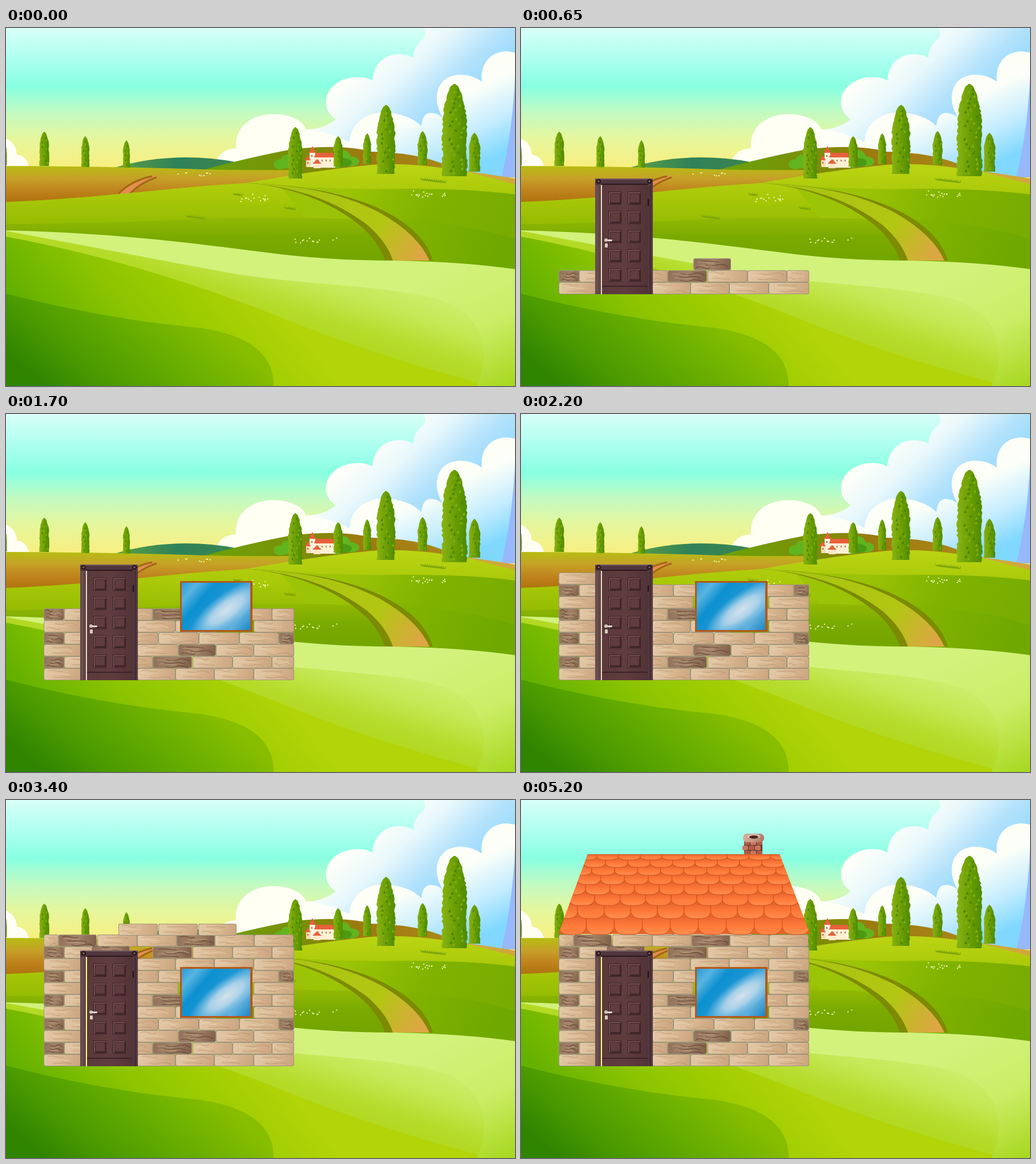
An HTML page with a canvas that plays this animation: 892 px wide and 628 px high, repeating every 8 s.

```html
<!DOCTYPE html>
<html lang="en">
<head>
<meta charset="utf-8">
<title>Building a house</title>
<style>
html, body { margin: 0; width: 100%; height: 100%; overflow: hidden; }
canvas { display: block; }
</style>
</head>
<body>
<canvas id="stage" width="892" height="628"></canvas>
<script>
const W = 892, H = 628, LOOP = 8000, STEP = 50;
const stage = document.getElementById('stage').getContext('2d');
let ctx = stage;

const noise = n => { const v = Math.sin(n * 127.1 + 3.7) * 43758.5453; return v - Math.floor(v); };

// Stops are evenly spread colours, or [position, colour] pairs.
function gradient(x0, y0, x1, y1, ...stops) {
  const g = ctx.createLinearGradient(x0, y0, x1, y1);
  stops.forEach((s, i) => Array.isArray(s) ? g.addColorStop(...s) : g.addColorStop(i / (stops.length - 1), s));
  return g;
}
function shape(d, fill, stroke, width = 1) {
  const path = new Path2D(d);
  if (fill) { ctx.fillStyle = fill; ctx.fill(path); }
  if (stroke) { ctx.strokeStyle = stroke; ctx.lineWidth = width; ctx.stroke(path); }
}
function rect(x, y, w, h, fill) { ctx.fillStyle = fill; ctx.fillRect(x, y, w, h); }
function rounded(x, y, w, h, r, fill) {
  ctx.beginPath(); ctx.roundRect(x, y, w, h, r);
  ctx.fillStyle = fill; ctx.fill();
}
function oval(x, y, rx, ry, fill) {
  ctx.beginPath(); ctx.ellipse(x, y, rx, ry, 0, 0, 7);
  ctx.fillStyle = fill; ctx.fill();
}

// ---------- landscape ----------
function drawSky() {
  rect(0, 0, W, 270, gradient(0, 0, 0, 250, [0, '#d8fff8'], [.2, '#b0fff0'], [.41, '#88ffe2'],
    [.6, '#c4fac0'], [.78, '#e6f69c'], [1, '#fbee7c']));
  shape('M0 194Q18 202 19 222Q36 224 40 242H0Z', '#fffff4');
  shape('M732 0Q740 12 728 22Q714 34 714 52C694 40 646 42 642 92C618 78 566 88 561 126Q559 148 578 160Q556 178 524 178L520 260H892V0Z',
    gradient(640, 50, 800, 230, [0, '#fffff8'], [.25, '#e8f8fc'], [.5, '#b4e2fc'], [1, '#70d0ff']));
  shape('M370 231Q378 212 403 211C400 172 432 151 468 151C500 151 522 164 526 178Q560 180 602 200C604 166 632 148 662 148Q706 150 728 172Q730 148 746 149Q760 150 767 160C742 120 758 82 796 82Q818 82 834 94C830 62 850 41 878 41L892 43V262H370Z',
    gradient(640, 120, 720, 290, [0, '#fffff4'], [.35, '#fcfff8'], [.7, '#c4ecff'], [1, '#80d8ff']));
  shape('M892 86Q888 180 868 262H892Z', '#98b8fc');
}

function drawVillage() {
  const leaf = '#62b41e';
  [[481, 239, 12, 9], [493, 234, 12, 12], [590, 228, 14, 14], [605, 234, 14, 9], [580, 236, 12, 10]]
    .forEach(([x, y, rx, ry]) => oval(x, y, rx, ry, leaf));
  oval(590, 236, 16, 8, '#4c9a14');
  rect(540, 224, 37, 21, '#fff0d4');
  rect(532, 218, 10, 26, '#fff4dc');
  rect(526, 231, 8, 13, '#f8dcb8');
  rect(539, 236, 12, 10, '#ffe8c8');
  shape('M531 219L537 207L543 219ZM540 227L543 219H572L578 227ZM524 232L529 223L534 232ZM537 238L545 230L553 238Z', '#e8603c');
  [546, 553, 560, 567].forEach(x => rect(x, 231, 2, 3, '#b87858'));
  rect(535, 223, 2, 3, '#a86848');
  rect(528, 235, 2, 3, '#a86848');
}

function drawCypress(x, top, bottom, width) {
  const height = bottom - top, n = Math.round(height / 4), left = [], right = [];
  const body = u => Math.min(1, Math.sqrt(u * 2.4) + .05);
  for (let i = 0; i <= n; i++) {
    const u = i / n;
    const edge = side => width / 2 * body(u) * (.84 + .16 * noise(i * 2 + side + x));
    left.push(`${x - edge(0)} ${top + u * height}`);
    right.unshift(`${x + edge(1)} ${top + u * height}`);
  }
  shape(`M${x} ${top}L${left.join('L')}L${right.join('L')}Z`,
    gradient(x - width / 2, 0, x + width / 2, 0, '#8ab414', '#6c9e04', '#4c8a00'));
  for (let i = 3; i < n; i++) {
    const px = x + (noise(i * 7 + x) - .5) * width * .6 * body(i / n), py = top + height * i / n;
    shape(`M${px} ${py}l${width * .09} -5l1 6Z`, i % 2 ? '#4a8400' : '#80b00c');
  }
}

function drawFlowers(x, y, w, h, count) {
  for (let i = 0; i < count; i++)
    oval(x + noise(i + x) * w, y + noise(i * 3 + y) * h, 1.2, 1.1, '#f8fcc0');
}
function drawTuft(x, y, w) {
  for (let i = 0; i < w; i += 4)
    shape(`M${x + i} ${y + i * .12}l-3 -4l7 3l3 -4l-1 6Z`, '#7ea60c');
}

function drawFields() {
  shape('M190 245Q250 227 316 227Q360 227 402 235L350 250H190Z', gradient(200, 0, 400, 0, '#5a9c48', '#2e8258', '#3c8450'));
  shape('M345 249Q430 226 500 213Q590 203 640 217Q720 218 772 241L720 270H345Z',
    gradient(370, 0, 770, 0, [0, '#6ca008'], [.4, '#7d8c08'], [.65, '#a07810'], [1, '#a88818']));
  drawVillage();
  shape('M0 242Q200 243 345 248Q420 250 500 249L560 280L0 310Z',
    gradient(0, 242, 0, 304, [0, '#b6bd12'], [.35, '#c6a128'], [.7, '#bf821c'], [1, '#b07410']));
  shape('M196 292Q222 268 270 258L256 264Q228 274 216 292Z', '#e68d50');
  shape('M196 292Q218 268 256 260M216 292Q234 272 264 262', null, '#a06814', 3);
  shape('M0 305C150 300 280 280 420 272Q540 250 640 240Q740 232 892 271V430H0Z',
    gradient(0, 245, 0, 350, '#b9d312', '#a8c808', '#92ba00'));
  shape('M800 250Q850 257 892 264V274Z', '#d0a83c');
  shape('M480 277Q600 284 700 282Q820 282 892 292V430H600Z', gradient(600, 280, 850, 400, '#9cc406', '#80b300', '#78ac00'));
  shape('M650 335Q780 336 892 370V430H690Z', gradient(660, 340, 860, 400, '#86b600', '#6fa800'));
  shape('M0 344Q200 342 330 335Q500 330 620 336L690 410H520Q300 370 0 356Z',
    gradient(0, 335, 0, 400, '#90b804', '#7aaa00', '#74a600'));
  shape('M400 271C500 273 585 312 630 355Q656 382 664 408H748Q732 352 650 315C590 288 510 274 400 271Z', '#7d8a04');
  shape('M404 271C520 276 590 312 634 346Q668 376 678 408H742Q722 362 655 324C590 290 520 275 404 271Z',
    gradient(500, 280, 720, 410, [0, '#a8c410'], [.65, '#b2c612'], [1, '#dda644']));
  drawTuft(318, 332, 28); drawTuft(489, 317, 14); drawTuft(400, 293, 10); drawTuft(728, 267, 38);
  drawFlowers(394, 291, 66, 14, 16);
  drawFlowers(506, 368, 74, 9, 14);
  drawFlowers(710, 285, 64, 12, 18);
  drawFlowers(300, 254, 60, 6, 9);
}

function drawForeground() {
  shape('M0 355C200 360 330 378 450 393Q560 408 680 408Q800 410 892 423V628H0Z',
    gradient(760, 430, 860, 640, '#d2f27c', '#cbed66', '#a8d820'));
  shape('M0 356C110 376 230 400 400 431C530 452 690 452 770 480Q840 510 838 580Q834 610 824 628H0Z',
    gradient(700, 450, 640, 640, [0, '#cdee6e'], [.25, '#c4e854'], [.5, '#b6dc2c'], [1, '#a8d008']));
  shape('M0 366C180 400 340 450 500 515Q640 572 826 622V628H0Z',
    gradient(420, 420, 150, 640, [0, '#b2d408'], [.35, '#9ccc00'], [.6, '#8cc400'], [1, '#62b000']));
  shape('M0 466C100 492 220 515 340 526Q470 545 469 628H0Z',
    gradient(330, 490, 150, 700, [0, '#88be00'], [.4, '#64ac00'], [.75, '#489800'], [1, '#2f8400']));
}

function drawLandscape() {
  drawSky();
  drawFields();
  [[0, 208, 241, 3], [67, 182, 242, 18], [139, 190, 244, 15], [211, 197, 245, 13], [582, 190, 243, 17],
   [633, 185, 239, 15], [730, 181, 240, 18], [821, 184, 252, 21], [507, 174, 264, 26],
   [666, 135, 256, 34], [786, 98, 260, 46]].forEach(tree => drawCypress(...tree));
  drawForeground();
}

// ---------- house ----------
function drawBrick({ x, y, w, dark }) {
  rounded(x, y, w, 21, 3, '#9d957c');
  rounded(x + 1, y + 1, w - 2, 19, 3, dark
    ? gradient(x, y, x + w, y + 20, '#90705a', '#a28266', '#7e5c48')
    : gradient(x, y, x + w, y + 20, '#e4caa8', '#d9b892', '#cba47e'));
  ctx.save();
  ctx.globalAlpha = dark ? .75 : .45;
  for (let i = 0; i < (dark ? 5 : 3); i++) {
    const r = noise(x + y * 3 + i), ly = y + 4 + i * (dark ? 3 : 5) + r * 2;
    const start = x + 3 + r * w * .3, length = (w - 8) * (.4 + .3 * r);
    shape(`M${start} ${ly}q${length / 4} ${r * 8 - 4} ${length / 2} 0t${length / 2} ${r * 3}`, null,
      dark ? (i % 2 ? '#c0a284' : '#583c2c') : (i % 2 ? '#f4e4c8' : '#a88260'), 1.2);
  }
  ctx.restore();
}

function drawWindow() {
  rect(305, 293, 127, 89, '#b4581a');
  ctx.save();
  ctx.beginPath(); ctx.rect(308, 296, 120, 83); ctx.clip();
  rect(308, 296, 120, 83, gradient(315, 290, 425, 385, [0, '#2c9ed8'], [.14, '#58b4e0'], [.3, '#0c90d0'],
    [.5, '#1c96d4'], [.8, '#60b0dc'], [1, '#1484c4']));
  ctx.translate(386, 344); ctx.rotate(-.65); ctx.scale(1, .36);
  const shine = ctx.createRadialGradient(0, 0, 0, 0, 0, 78);
  [[0, '#d4e2ec'], [.45, '#c4dcecd0'], [1, '#a0d0ec00']].forEach(s => shine.addColorStop(...s));
  oval(0, 0, 78, 78, shine);
  ctx.restore();
}

function drawDoorLeaf(openness) {
  ctx.save();
  ctx.translate(222, 0); ctx.scale(1 - openness, 1); ctx.translate(-222, 0);
  rect(142, 275, 80, 192, gradient(142, 0, 222, 0, '#5a393c', '#603c3e', '#523438'));
  for (let row = 0; row < 5; row++) for (const x of [153, 187]) {
    const y = 287 + row * 33.7;
    rect(x, y, 23, 23, '#3c2226');
    rect(x + 1, y + 1, 21, 21, '#73504f');
    rect(x + 3, y + 3, 19, 19, '#40262a');
    rect(x + 4, y + 4, 16, 15, '#603c3e');
  }
  rect(142, 452, 80, 2, '#3c2428');
  rounded(146, 371, 14, 3, 1.5, '#e4dcd4');
  oval(149, 372, 3, 3, '#d0c4b8');
  rounded(147, 378, 5, 7, 1, '#d8ccc0');
  ctx.restore();
}
function drawDoorFrame() {
  const wood = gradient(130, 0, 231, 0, '#644a4e', '#4c3238', '#54383e');
  rect(130, 264, 10, 203, wood);
  rect(222, 264, 9, 203, wood);
  rect(130, 264, 101, 11, '#50363e');
  rect(130, 264, 101, 2, '#705860');
  rect(140, 273, 82, 2, '#2c181c');
  rect(133, 276, 1, 191, '#785a5e');
  rect(226, 276, 1, 191, '#30202a');
  for (const x of [136, 225]) { oval(x, 269, 4, 4, '#241418'); oval(x, 269, 2, 2, '#74585c'); }
  rect(222, 300, 2, 12, '#201014');
}

function drawBuilder() {
  const ink = '#4a2c1c', skin = '#f0ac84', blue = '#1668bc';
  shape('M164 384Q146 386 148 402L158 407L168 398ZM198 384Q212 390 211 406L200 412Z', '#d8f0fc', '#5888b0');
  shape('M166 385H200L202 414L204 442H184L182 426L178 443H158L164 414Z', blue, '#0c3c80');
  shape('M170 384L174 396H192L196 384Z', '#d8f0fc');
  shape('M168 384L174 404M197 384L190 402', null, '#0c489c', 3);
  shape('M150 454Q151 446 160 441L178 443L176 457Q160 461 150 454ZM184 443L204 441Q210 450 209 456Q196 461 183 457Z', '#7c3818', '#3c1808');
  shape('M165 354Q163 364 165 372Q171 388 184 388Q198 386 202 371L203 354Z', skin, ink);
  oval(163, 366, 3, 5, skin); oval(205, 365, 3, 5, skin);
  oval(177, 364, 4, 3, '#fff'); oval(190, 364, 4, 3, '#fff');
  oval(178, 364, 1.5, 1.8, '#222'); oval(189, 364, 1.5, 1.8, '#222');
  shape('M172 360L181 361M187 361L196 359', null, ink, 2);
  oval(184, 370, 5, 4, '#ec9870');
  shape('M174 376Q184 384 195 375Q184 379 174 376Z', '#fff', ink);
  shape('M160 358Q160 333 185 333Q208 334 208 357Q186 352 160 358Z', '#e4c81c', '#906c00');
  shape('M158 359Q185 349 211 357L209 361Q184 355 161 362Z', '#d0b410', '#906c00');
  shape('M176 335L174 353M185 333V352M195 335L197 353', null, '#a8a010', 2);
  shape('M153 404L176 407L173 419L160 420Z', '#905830', '#482810');
  shape('M166 402L172 398M169 408V396M158 405L156 398', null, '#8c9498', 2);
  oval(158, 405, 5, 4, skin);
  shape('M190 396L196 391L198 376Q202 373 204 378L203 391L208 394V406Q199 413 190 407Z', skin, ink);
  shape('M192 399H200M192 403H200', null, '#b06c48');
}

function drawRoof() {
  const edges = [96, 105, 118, 132, 148, 166, 185, 208, 236], tiles = 9;
  const leftAt = y => 117 - (y - 96) * 51 / 138, rightAt = y => 453 + (y - 96) * 53 / 138;
  ctx.save();
  ctx.clip(new Path2D('M117 95H453L507 236Q490 240 470 238H66V234Z'));
  for (let row = edges.length - 1; row > 0; row--) {
    const y0 = edges[row - 1], y1 = edges[row], h = y1 - y0;
    const left = leftAt(y1), w = (rightAt(y1) - left) / tiles;
    rect(left - 2, y0 - 2, w * tiles + 4, h + 1, '#e8642c');
    for (let i = -1; i <= tiles; i++) {
      const x = left + (i + (row % 2) / 2) * w;
      const fill = gradient(0, y0, 0, y1, '#f06a30', '#ff7c3c', noise(row * 13 + i) > .5 ? '#ff9050' : '#ff8444');
      shape(`M${x} ${y0 - 8}V${y1 - h * .45}Q${x + w * .08} ${y1} ${x + w * .35} ${y1}H${x + w * .65}Q${x + w * .92} ${y1} ${x + w} ${y1 - h * .45}V${y0 - 8}Z`,
        fill, '#d0541f', 1.2);
    }
  }
  ctx.restore();
  shape('M117 96H453', null, '#d8602c', 1.5);
}

function drawChimney() {
  rect(391, 70, 32, 26, '#6c3830');
  for (let row = 0; row < 3; row++) for (let i = 0; i < 3; i++)
    rounded(391 + i * 11 - (row % 2) * 3, 71 + row * 9, 10, 8, 2, (row + i) % 2 ? '#c87860' : '#b05c48');
  rounded(389, 59, 37, 15, 7, gradient(389, 58, 426, 74, '#dcb09c', '#c89c88', '#a87060'));
  oval(408, 64, 11, 4, '#e4c4b4');
  oval(408, 65, 8, 3, '#4c2824');
}

// ---------- building schedule ----------
const bricks = [];
let clock = STEP;
function lay(row, list) {
  for (const [x, w, dark] of list) {
    bricks.push({ at: clock, x, y: 446 - 21 * row, w, dark });
    clock += STEP;
  }
}
const pick = (list, ...indices) => indices.map(i => list[i]);

// The courses repeat every four rows.
const courseA = [[66, 66], [230, 67], [297, 68], [365, 69], [434, 71]];
const courseB = [[66, 36, 1], [102, 68], [188, 69], [257, 69, 1], [327, 70], [397, 69], [466, 39]];
const courseC = [[66, 66], [230, 72], [302, 66, 1], [368, 66], [434, 71]];
const courseD = [[66, 36, 1], [102, 68], [197, 70], [267, 71], [338, 71], [409, 69], [478, 27, 1]];

const doorAt = clock;
lay(0, courseA);
lay(1, courseB);
lay(2, pick(courseC, 2, 0, 1, 3, 4));
lay(3, courseD);
const windowAt = clock; // the sill rests on the fourth row
lay(4, pick(courseA, 0, 1, 2, 4));
lay(5, pick(courseB, 0, 1, 2, 3, 5, 6));
lay(6, pick(courseC, 0, 1, 4));
lay(7, pick(courseD, 0, 1, 2, 3, 5, 6));
lay(8, courseA);
lay(9, pick(courseB, 0, 1));
lay(193 / 21, [[150, 67, 1]]);
lay(9, pick(courseB, 3, 4, 5));
clock -= STEP;
lay(9, pick(courseB, 6));
lay(10, [[66, 26], [92, 67, 1], [160, 70], [230, 69], [299, 67, 1], [366, 69], [435, 69]]);
clock = 3300;
lay(229 / 21, [[197, 69], [267, 69], [337, 67]]);
lay(249 / 21, [[232, 68], [301, 68]]);

function drawDoor(t) {
  const openness = t >= 4000 && t < 5000 ? 1 : t >= 3800 && t < 5200 ? .5 : 0;
  rect(140, 275, openness ? 82 : 2, 192, t >= 3250 ? '#fffc72' : '#e8dcb8');
  if (openness) drawBuilder();
  if (openness < 1) drawDoorLeaf(openness);
  drawDoorFrame();
}

const backdrop = document.createElement('canvas');
backdrop.width = W; backdrop.height = H;
ctx = backdrop.getContext('2d');
drawLandscape();
ctx = stage;

function render(t) {
  ctx.drawImage(backdrop, 0, 0);
  bricks.filter(b => b.at <= t).forEach(drawBrick);
  if (t >= windowAt) drawWindow();
  if (t >= doorAt) drawDoor(t);
  if (t >= 3800) drawChimney();
  if (t >= 3600) drawRoof();
}

const origin = performance.now();
function tick() {
  render((performance.now() - origin) % LOOP);
  requestAnimationFrame(tick);
}
tick();
</script>
</body>
</html>
```
